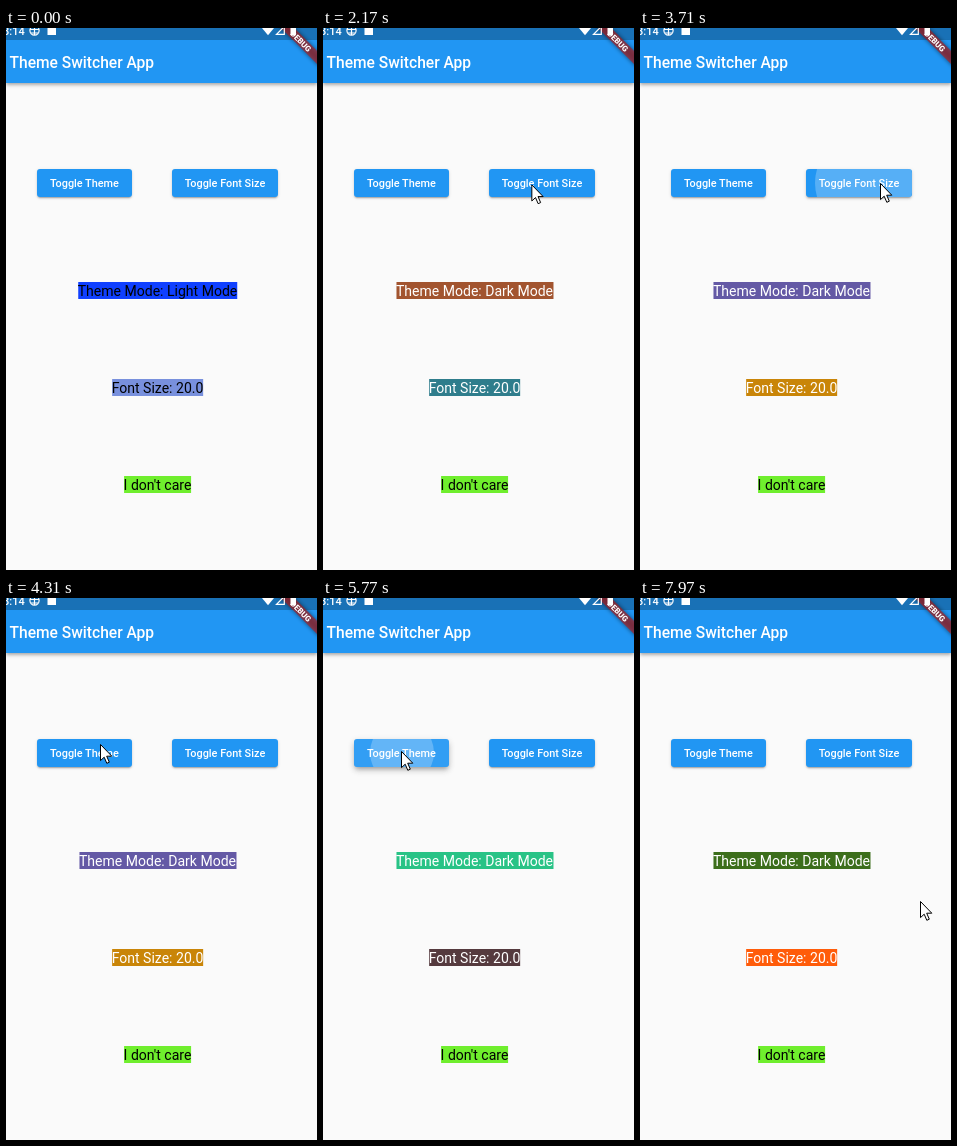
Recreate the animation shown at these times as an HTML page. Size 311x542 px, loop 8 s.

```html
<!DOCTYPE html>
<html lang="en">
<head>
<meta charset="utf-8">
<title>Theme Switcher App</title>
<style>
html, body { margin: 0; width: 100%; height: 100%; overflow: hidden; }
body { position: relative; background: #fafafa; font-family: Roboto, sans-serif; }
body > * { position: absolute; }
.bar { left: 0; top: 12px; width: 100%; height: 43.4px; background: #2196f3;
  box-shadow: 0 1.5px 3px rgba(0,0,0,.26), 0 3px 4px rgba(0,0,0,.1); }
.bar span { position: absolute; left: 3.5px; top: 1px; line-height: 44px; color: #fff;
  font-size: 15.6px; font-weight: 500; white-space: nowrap; }
.status { left: 0; top: 0; width: 100%; height: 12px; background: #1971b6; }
.top { left: 0; top: 0; }
.btn { top: 141px; height: 28px; border-radius: 3px; background: #2196f3; color: #fff; }
.btn span { position: absolute; left: 0; top: 1px; width: 100%; text-align: center;
  line-height: 28px; font-size: 10.9px; font-weight: 500; white-space: nowrap; }
.ink { position: absolute; inset: 0; border-radius: 3px; overflow: hidden; }
.ink i { position: absolute; border-radius: 50%; background: #fff; }
.label { left: 151.5px; transform: translateX(-50%); height: 16.8px; line-height: 18.5px;
  font-size: 14.04px; white-space: nowrap; color: #000; }
#cursor { left: 0; top: 0; overflow: visible; }
</style>
</head>
<body>
<div class="status"></div>
<div class="bar"><span>Theme Switcher App</span></div>
<svg class="top" width="311" height="60">
  <filter id="soft" x="-20%" y="-100%" width="140%" height="300%"><feGaussianBlur stdDeviation="2"/></filter>
  <g transform="translate(294.9 13.3) rotate(45)">
    <rect x="-31" y="-4.7" width="62" height="9.4" fill-opacity=".5" filter="url(#soft)"/>
    <rect x="-31" y="-4.7" width="62" height="9.4" fill="#b71c1c" fill-opacity=".63"/>
    <text y="2.8" text-anchor="middle" fill="#fff" font-family="Roboto, sans-serif"
      font-size="8" font-weight="900">DEBUG</text>
  </g>
  <g fill="#fff">
    <text x="-3" y="7" font-family="Roboto, sans-serif" font-size="11" font-weight="500">8:14</text>
    <g fill="none" stroke="#fff" stroke-width="1.2">
      <circle cx="28.5" cy="2.5" r="4.6"/>
      <path d="M24 1.5h9M25 5h7M28.5 -2v9"/>
      <path d="M278.3 -1.5V6.3H270.5Z"/>
    </g>
    <path d="M44 -2h6V7h-8.500V0.500Z"/>
    <path d="M256 0Q262 -4 268 0L262 7.300Z"/>
    <rect x="284.500" y="-3" width="5.500" height="10" rx=".8"/>
  </g>
</svg>
<div class="btn" style="left:31px;width:95px"><div class="ink"><i></i></div><span>Toggle Theme</span></div>
<div class="btn" style="left:166px;width:106px"><div class="ink"><i></i></div><span>Toggle Font Size</span></div>
<div class="label" id="theme" style="top:254px"></div>
<div class="label" id="size" style="top:351px"></div>
<div class="label" style="top:448px;background:#6fee2d">I don't care</div>
<svg id="cursor" width="13" height="21">
  <path d="M.5 .5V16.600L4.200 13.200 6.800 19.300 9.300 18.200 6.700 12.200H11.800Z"
    fill="#fff" stroke="#000"/>
</svg>
<script>
const LOOP = 8000;
const THEME = 0, FONT = 1;
const boxes = [[31, 95], [166, 106]];
const TOP = 141, HEIGHT = 28;

// Each tap flips one setting and repaints both labels.
const taps = [
  { btn: THEME, down: 1340, up: 1480, x: 86, y: 151, colors: ['#a2542f', '#2f7d8c'] },
  { btn: FONT, down: 2720, up: 2925, x: 240, y: 155, colors: ['#4c7c1a', '#a8388f'] },
  { btn: FONT, down: 3500, up: 3640, x: 240, y: 155, colors: ['#6459a5', '#c98508'] },
  { btn: THEME, down: 4580, up: 4740, x: 78, y: 154, colors: ['#d3a63c', '#5fb0d8'] },
  { btn: THEME, down: 5560, up: 5757, x: 79, y: 154, colors: ['#28c386', '#553a3e'] },
  { btn: FONT, down: 6640, up: 6780, x: 240, y: 155, colors: ['#b91c5a', '#48ff20'] },
  { btn: FONT, down: 7320, up: 7480, x: 240, y: 155, colors: ['#3c6e1b', '#ff5c0a'] }
];

// Pointer stops: time, x, y
const path = [
  [0, 278, 546], [180, 278, 546], [1050, 84, 151], [1250, 84, 150], [1830, 84, 150],
  [2310, 240, 158], [2480, 240, 158], [2550, 240, 155], [3990, 240, 155],
  [4310, 94, 146], [4520, 77, 154], [5170, 77, 154], [5240, 78, 153], [6150, 78, 153],
  [6300, 92, 154], [6400, 92, 154], [6640, 240, 156], [7600, 240, 156], [7970, 280, 303],
  [LOOP, 280, 303]
];

const clamp = v => Math.min(1, Math.max(0, v));
const mix = (a, b, k) => a + (b - a) * k;
const smooth = k => k * k * (3 - 2 * k);

// cubic-bezier(.25, .1, .25, 1)
function ease(x) {
  const at = (a, b, s) => 3 * a * s * (1 - s) ** 2 + 3 * b * s * s * (1 - s) + s ** 3;
  let lo = 0, hi = 1;
  for (let i = 0; i < 20; i++) {
    const s = (lo + hi) / 2;
    if (at(.25, .25, s) < x) lo = s; else hi = s;
  }
  return at(.1, 1, lo);
}

function shadow(k) {
  const layer = (a, b, alpha) =>
    a.map((v, i) => (mix(v, b[i], k) * .78).toFixed(2) + 'px').join(' ') + ` rgba(0,0,0,${alpha})`;
  return [
    layer([0, 3, 1, -2], [0, 4, 5, -2], .2),
    layer([0, 2, 2, 0], [0, 5, 8, 0], .14),
    layer([0, 1, 5, 0], [0, 2, 9, 0], .1)
  ].join(',');
}

const buttons = [...document.querySelectorAll('.btn')].map(el => (
  { el, ink: el.querySelector('.ink'), drop: el.querySelector('i') }));
const themeLabel = document.getElementById('theme');
const sizeLabel = document.getElementById('size');
const cursor = document.getElementById('cursor');

function drawButton(id, t) {
  const { el, ink, drop } = buttons[id];
  const tap = taps.find(p => p.btn === id && t >= p.down && t < p.up + 375);
  if (!tap) {
    el.style.boxShadow = shadow(0);
    ink.style.background = 'none';
    drop.style.opacity = 0;
    return;
  }
  const [left, width] = boxes[id];
  const held = Math.min(t, tap.up) - tap.down, after = Math.max(0, t - tap.up);
  const lift = smooth(clamp(clamp(held / 200) - after / 150));
  const k = ease(clamp(held / 1000 + after / 225));
  const reach = Math.hypot(width, HEIGHT) / 2;
  const r = mix(reach * .3, reach + 5, k);
  const x = mix(tap.x - left, width / 2, k), y = mix(tap.y - TOP, HEIGHT / 2, k);
  const fade = clamp((t - tap.down) / 75) * (1 - clamp((after - 225) / 150));
  el.style.boxShadow = shadow(lift);
  ink.style.background = id === THEME ? `rgba(255,255,255,${.08 * fade})` : 'none';
  drop.style.cssText =
    `left:${x - r}px;top:${y - r}px;width:${2 * r}px;height:${2 * r}px;opacity:${.24 * fade}`;
}

function drawLabels(t) {
  let dark = false, small = false, colors = ['#1040ff', '#7890dd'];
  for (const tap of taps) {
    if (t < tap.up) break;
    if (tap.btn === THEME) dark = !dark; else small = !small;
    colors = tap.colors;
  }
  themeLabel.textContent = `Theme Mode: ${dark ? 'Dark' : 'Light'} Mode`;
  sizeLabel.textContent = `Font Size: ${small ? '16.0' : '20.0'}`;
  [themeLabel, sizeLabel].forEach((el, i) => {
    el.style.background = colors[i];
    el.style.color = dark ? '#fff' : '#000';
  });
}

function drawCursor(t) {
  const i = path.findIndex(p => p[0] > t);
  const a = path[i - 1], b = path[i];
  const k = smooth((t - a[0]) / (b[0] - a[0]));
  cursor.style.transform = `translate(${mix(a[1], b[1], k)}px,${mix(a[2], b[2], k)}px)`;
}

function draw(now) {
  const t = Math.max(0, now) % LOOP;
  drawButton(THEME, t);
  drawButton(FONT, t);
  drawLabels(t);
  drawCursor(t);
}

const start = performance.now();
function tick() {
  draw(performance.now() - start);
  requestAnimationFrame(tick);
}
tick();
</script>
</body>
</html>
```
